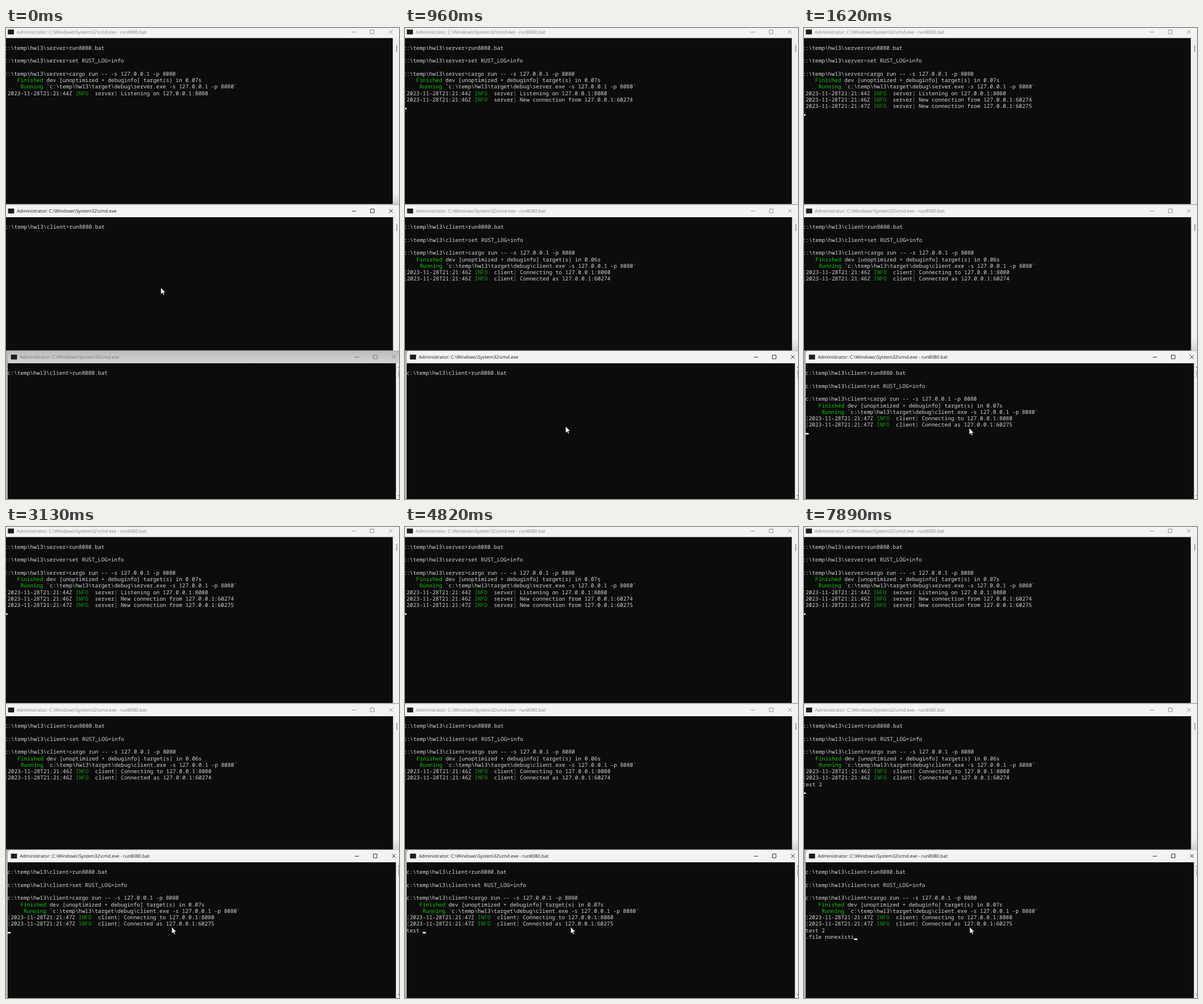
Animation, 684 px wide and 819 px high, one loop 8 s. Source, as an HTML page:

```html
<!DOCTYPE html>
<html lang="en">
<head>
<meta charset="utf-8">
<title>Client and server consoles</title>
<style>
  html, body { margin: 0; width: 684px; height: 819px; overflow: hidden; background: #b4b4b4; }
  svg { display: block; }
  text { white-space: pre; text-rendering: geometricPrecision; }
  .mono { font: 9.4px "Noto Sans Mono", "DejaVu Sans Mono", monospace; fill: #d6d6d6; }
  .title { font: 8.02px "Open Sans", "Noto Sans", sans-serif; }
  .bright { fill: #16c60c; }
  .info { fill: #13a10e; }
  .dim { fill: #767676; }
</style>
</head>
<body>
<svg id="stage" width="684" height="819" viewBox="0 0 684 819"></svg>
<script>
const LOOP = 8000, CELL = 5.64, ROW = 11.27;
const stage = document.getElementById('stage');

// [start, value...]: each entry holds until the next one starts
const pointerPath = [
  [0, 269, 451], [150, 272, 454], [300, 276, 457], [430, 276, 477], [560, 277, 535],
  [690, 278, 616], [820, 278, 670], [950, 279, 692], [1080, 279, 697], [1200, 281, 697],
  [1340, 284, 696], [1480, 287, 695], [1770, 288, 694.5], [2170, 288, 695]
];
const firstInput = [
  [0, ''], [3500, 't'], [3640, 'ts'], [3770, 'tset'], [4040, 'tse'], [4170, 'ts'], [4300, 't'],
  [4430, 'te'], [4560, 'tes'], [4690, 'test'], [4820, 'test '], [4940, 'test 2']
];
const secondInput = [
  [0, ''], [6250, '.'], [6390, '.fi'], [6520, '.file'], [6660, '.file '], [7070, '.file n'],
  [7210, '.file no'], [7340, '.file none'], [7620, '.file nonex'], [7750, '.file nonexis'],
  [7890, '.file nonexisti']
];
const at = (list, t) => list.findLast(entry => entry[0] <= t);
const within = (t, from, to) => t >= from && t < to;

const stamp = (sec, app, msg) => `[2023-11-28T21:21:${sec}Z INFO  ${app}] ${msg}`;
const launch = (app, secs) => [
  '', `c:\\temp\\hw13\\${app}>run8080.bat`,
  '', `c:\\temp\\hw13\\${app}>set RUST_LOG=info`,
  '', `c:\\temp\\hw13\\${app}>cargo run -- -s 127.0.0.1 -p 8080`,
  `    Finished dev [unoptimized + debuginfo] target(s) in ${secs}s`,
  `     Running \`c:\\temp\\hw13\\target\\debug\\${app}.exe -s 127.0.0.1 -p 8080\``
];
const session = (secs, sec, port) => [
  ...launch('client', secs),
  stamp(sec, 'client', 'Connecting to 127.0.0.1:8080'),
  stamp(sec, 'client', 'Connected as 127.0.0.1:' + port)
];

const span = (cls, s) => `<tspan class="${cls}">${s}</tspan>`;
const paint = line => line
  .replace(/^\[(\S+) INFO  (\w+)\]/, (_, time, app) =>
    `${span('dim', '[')}${time} ${span('info', 'INFO')}  ${app}${span('dim', ']')}`)
  .replace(/^( +)(Finished|Running)/, (_, pad, word) => pad + span('bright', word));

const rect = (x, y, w, h, fill, more = '') =>
  `<rect x="${x}" y="${y}" width="${w}" height="${h}" fill="${fill}" ${more}/>`;

// shaded: title bar under a shadow; footShade: shadow cast by the active window below
function drawWindow({ dx, mid, top, bottom, lines, cursor, active, running, shaded, footShade }) {
  const ink = active ? '#1a1a1a' : shaded ? '#777' : '#868686';
  const left = dx - 2, right = 673.6 + dx, x = left - .5, thumb = 679.6 + .7 * dx;
  const title = 'Administrator: C:\\Windows\\System32\\cmd.exe' + (running ? ' - run8080.bat' : '');
  let out = rect(left, mid - 10.3, 720, bottom - mid + 10.3, shaded ? 'url(#shade)' : '#f3f3f3', 'rx="5"')
    + rect(right, top, 20, bottom - top, '#f0f0f0')
    + (footShade ? rect(right, bottom - 20, 20, 20, 'url(#foot)') : '')
    + rect(left, top, right - left, bottom - top, '#0c0c0c')
    + rect(3.6 + dx, mid - 4, 10.6, 8.4, '#1c1c1c')
    + `<text class="title" x="${19 + dx}" y="${mid + 3}" fill="${ink}">${title}</text>`
    + `<path d="M${602 + dx} ${mid + .4}h7.4M${634.4 + dx} ${mid - 3.2}h6.4v6.4h-6.4z`
    + `M${666.7 + dx} ${mid - 3.3}l6.6 6.6m0-6.6l-6.6 6.6" fill="none" stroke="${ink}" stroke-width=".9"/>`
    + rect(thumb, top + 12, 1.4, 12, '#868686');
  lines.forEach((line, i) => {
    if (line) out += `<text class="mono" x="${x}" y="${top + i * ROW + 9}">${paint(line)}</text>`;
  });
  if (cursor) {
    const [col, row] = cursor;
    out += rect(x + col * CELL, top + (row + 1) * ROW - 2.8, CELL, 2.6, '#f2f2f2');
  }
  return out;
}

// The shaded title bar is the first part of a much taller window.
const defs = `<defs><linearGradient id="shade" x2="0" y2=".09"><stop stop-color="#bcbcbc"/>`
  + `<stop offset="1" stop-color="#d6d6d6"/></linearGradient><linearGradient id="foot" x2="0" y2="1">`
  + `<stop stop-color="#f0f0f0"/><stop offset="1" stop-color="#d2d2d2"/></linearGradient></defs>`;

function scene(t) {
  const onThird = t >= 950;
  const server = [...launch('server', '0.07'), stamp(44, 'server', 'Listening on 127.0.0.1:8080')];
  if (t >= 300) server.push(stamp(46, 'server', 'New connection from 127.0.0.1:60274'));
  if (t >= 1340) server.push(stamp(47, 'server', 'New connection from 127.0.0.1:60275'));

  const second = session('0.06', 46, 60274).slice(0, t < 150 ? 2 : t < 300 ? 6 : 10);
  if (t >= 5190) second.push('test 2');

  const third = session('0.07', 47, 60275).slice(0, t < 1200 ? 2 : t < 1340 ? 6 : 10);
  let thirdCursor = null;
  if (t >= 1340) {
    third.push(at(firstInput, t)[1]);
    if (t >= 5190) third.push(at(secondInput, t)[1]);
    const hidden = within(t, 2600, 3130) || within(t, 5710, 6250);
    if (!hidden) thirdCursor = [third.at(-1).length, third.length - 1];
  }

  const [, px, py] = at(pointerPath, t);
  return defs
    + drawWindow({ dx: -.4, mid: 6.7, top: 17.5, bottom: 306, lines: server, running: true,
      footShade: !onThird, cursor: t >= 300 && [0, server.length] })
    + drawWindow({ dx: 0, mid: 318, top: 329, bottom: 560.7, lines: second, active: !onThird, running: t >= 150,
      footShade: onThird, cursor: (within(t, 300, 820) || t >= 5190) && [0, second.length] })
    + drawWindow({ dx: 5, mid: 572, top: 583, bottom: 819, lines: third, active: onThird, shaded: !onThird,
      running: t >= 1200, cursor: thirdCursor })
    + '<path d="M684 588l-2 3h2zM684 815l-2-3h2z" fill="#777"/>'
    + `<path transform="translate(${px} ${py})" d="M.5 .5V12l2.6-2.4 1.8 4 1.8-.8-1.8-3.8h3.6z" fill="#fff" stroke="#000" stroke-width=".5"/>`;
}

let shown = '';
function tick() {
  const next = scene(performance.now() % LOOP);
  if (next !== shown) stage.innerHTML = shown = next;
  requestAnimationFrame(tick);
}
tick();
</script>
</body>
</html>
```
